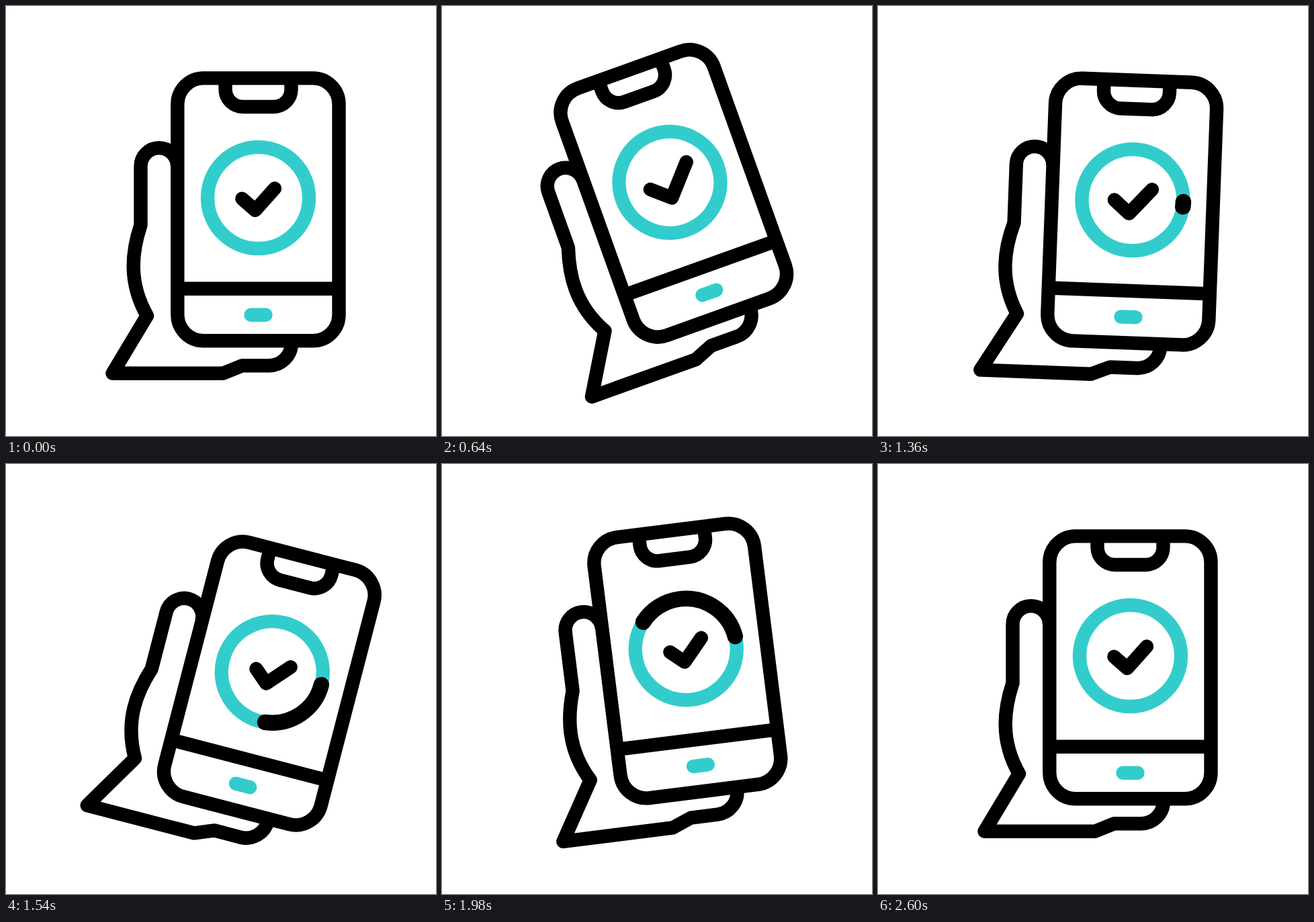
An HTML page for the animation above (2820 ms loop, 640 px wide and 640 px high).

```html
<!DOCTYPE html>
<html lang="en">
<head>
<meta charset="utf-8">
<title>Phone confirmation</title>
<style>
  html, body { margin: 0; width: 100%; height: 100%; overflow: hidden; background: #fff; }
  svg { display: block; width: 100%; height: 100%; }
</style>
</head>
<body>
<svg viewBox="0 0 640 640" fill="none" stroke="#000" stroke-width="20.4" stroke-linejoin="round">
  <g id="scene">
    <path d="M255 238.5A27.2 27.2 0 0 0 200.5 238.5V326C188 364 181 410 210 461L158.5 546.7H323L351.5 535.3H391.5A33.5 33.5 0 0 0 425 502"/>
    <rect x="255.3" y="107.4" width="240.2" height="390.9" rx="38.7" fill="#fff"/>
    <path d="M326.5 107.4V124A26 26 0 0 0 352.5 150H398.5A26 26 0 0 0 424.5 124V107.4M255.3 420.8H495.5"/>
    <g stroke="#3cc" stroke-linecap="round">
      <circle cx="375.5" cy="285.5" r="75.5"/>
      <path d="M364.5 459.8H386.5"/>
    </g>
    <circle id="sweep" cx="375.5" cy="285.5" r="75.5" pathLength="360" stroke-width="23.5" stroke-linecap="round"/>
    <path id="check" d="M351.3 286.8L371 304L400 271.5" stroke-linecap="round"/>
  </g>
</svg>
<script>
const LOOP = 2820, STEP = 20;
const [scene, sweep, check] = ["scene", "sweep", "check"].map(id => document.getElementById(id));

const smooth = u => (1 - Math.cos(Math.PI * u)) / 2;
const settle = u => (1 - Math.exp(-4.84 * u)) / (1 - Math.exp(-4.84));

// Each key is [time, value, easing towards it].
function track(keys, t) {
  const i = keys.findIndex(k => k[0] > t);
  if (i < 0) return keys[keys.length - 1][1];
  if (i === 0) return keys[0][1];
  const [t0, v0] = keys[i - 1], [t1, v1, ease = smooth] = keys[i];
  return v0 + (v1 - v0) * ease((t - t0) / (t1 - t0));
}

const swing = [[200, 0], [990, -21, settle], [1632, 16.4], [2010, -7.5], [2350, 3.2], [2600, 0]];
const checkScale = [[200, 1], [940, 1.5], [1590, 1]];
const sweepHead = [[1300, 0], [2050, 360]];
const sweepTail = [[1552, 0], [2302, 360]];

function draw(t) {
  scene.setAttribute("transform", `rotate(${track(swing, t)} 291 379)`);

  const s = track(checkScale, t);
  check.setAttribute("transform", `translate(372 290.5) scale(${s}) translate(-372 -290.5)`);
  check.setAttribute("stroke-width", 20.4 / s);

  const tail = track(sweepTail, t), length = track(sweepHead, t) - tail;
  sweep.setAttribute("visibility", length > 0 ? "visible" : "hidden");
  sweep.setAttribute("stroke-dasharray", `${length} 720`);
  sweep.setAttribute("stroke-dashoffset", -tail);
}

function frame() {
  draw(Math.floor(performance.now() % LOOP / STEP) * STEP);
  requestAnimationFrame(frame);
}
frame();
</script>
</body>
</html>
```
